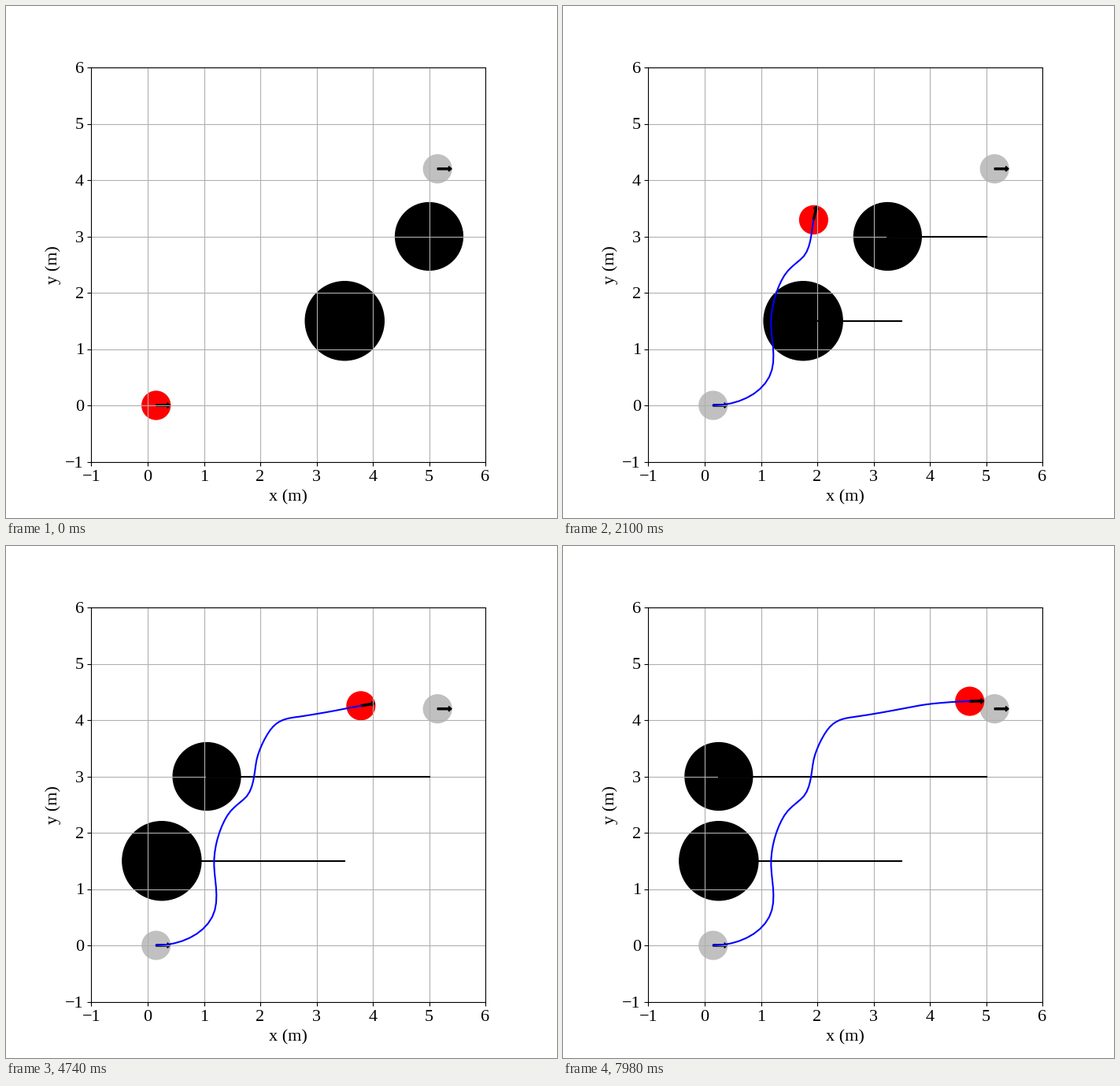
Write a matplotlib script that moves like this. It is 700 px wide and 650 px high and loops after 8000 ms.

```python
import numpy as np
import matplotlib.pyplot as plt
from matplotlib.animation import FuncAnimation
from matplotlib.patches import Arrow, Circle

plt.rcParams.update({"font.family": "Liberation Serif", "font.size": 16})

TICK = 20            # ms per drawn frame
HOLD = 3             # frames per simulation step
LOOP = 8000          # ms
STEPS = LOOP // (TICK * HOLD) + 1
RADIUS = 0.25
START = (0.15, 0.0)
GOAL = (5.15, 4.2)
GAIN = 0.0245        # robot speed per metre left to the goal

# step, x, y and heading in degrees at the turns of the route
KEYS = np.array([
    (0, *START, 0),
    (8, 1.147, 0.505, 63),
    (15.3, 1.179, 1.455, 90),
    (23, 1.417, 2.308, 58),
    (27.4, 1.723, 2.608, 42),
    (35, 1.936, 3.294, 78),
    (42, 2.230, 3.886, 46),
    (51, 2.737, 4.067, 9),
    (70, 3.497, 4.200, 11),
    (95, 4.158, 4.302, 5),
    (133, 4.709, 4.334, 1),
])


def hermite(t, knots, values, slopes):
    """Cubic curve through values with the given slopes at the knots."""
    i = np.clip(np.searchsorted(knots, t, side="right") - 1, 0, len(knots) - 2)
    h = knots[i + 1] - knots[i]
    u = (t - knots[i]) / h
    return ((1 + 2 * u) * (1 - u) ** 2 * values[i]
            + u * (1 - u) ** 2 * h * slopes[i]
            + u ** 2 * (3 - 2 * u) * values[i + 1]
            + u ** 2 * (u - 1) * h * slopes[i + 1])


steps = np.arange(STEPS)
knots, key_x, key_y, key_angle = KEYS.T
key_angle = np.radians(key_angle)
speed = GAIN * np.hypot(GOAL[0] - key_x, GOAL[1] - key_y)
path_x = hermite(steps, knots, key_x, speed * np.cos(key_angle))
path_y = hermite(steps, knots, key_y, speed * np.sin(key_angle))
heading = np.arctan2(np.gradient(path_y), np.gradient(path_x))
heading[0] = 0

fig, ax = plt.subplots(figsize=(7, 6.5), dpi=100)
ax.set_aspect("equal")
ax.set_xlim(-1, 6)
ax.set_ylim(-1, 6)
ax.tick_params(axis="x", pad=4.2)
ax.set_xlabel("x (m)", labelpad=4.7)
ax.set_ylabel("y (m)")
ax.grid(True)


def add_arrow(x, y, angle):
    arrow = Arrow(x, y, RADIUS * np.cos(angle), RADIUS * np.sin(angle),
                  width=0.15, color="black")
    return ax.add_patch(arrow)


def add_disc(x, y, radius, color):
    return ax.add_patch(Circle((x, y), radius, color=color))


for px, py in (START, GOAL):
    add_disc(px, py, RADIUS, "silver")
    add_arrow(px, py, 0)

obstacles = []
for ox, oy, size in ((3.5, 1.5, 0.7), (5.0, 3.0, 0.6)):
    xs = np.maximum(ox - 0.05 * steps, 0.25)
    disc = add_disc(ox, oy, size, "black")
    trail, = ax.plot([], [], color="black", lw=1.5)
    obstacles.append((disc, trail, xs, oy))

robot = add_disc(*START, RADIUS, "red")
robot_trail, = ax.plot([], [], color="blue", lw=1.5)
pointer = add_arrow(*START, 0)


def update(frame):
    global pointer
    n = frame // HOLD
    end = n + 1 if n else 0
    for disc, trail, xs, oy in obstacles:
        disc.center = xs[n], oy
        trail.set_data(xs[:end], np.full(end, oy))
    robot.center = path_x[n], path_y[n]
    robot_trail.set_data(path_x[:end], path_y[:end])
    pointer.remove()
    pointer = add_arrow(path_x[n], path_y[n], heading[n])
    return []


anim = FuncAnimation(fig, update, frames=LOOP // TICK, interval=TICK,
                     repeat=True, repeat_delay=0)
plt.show()
```
